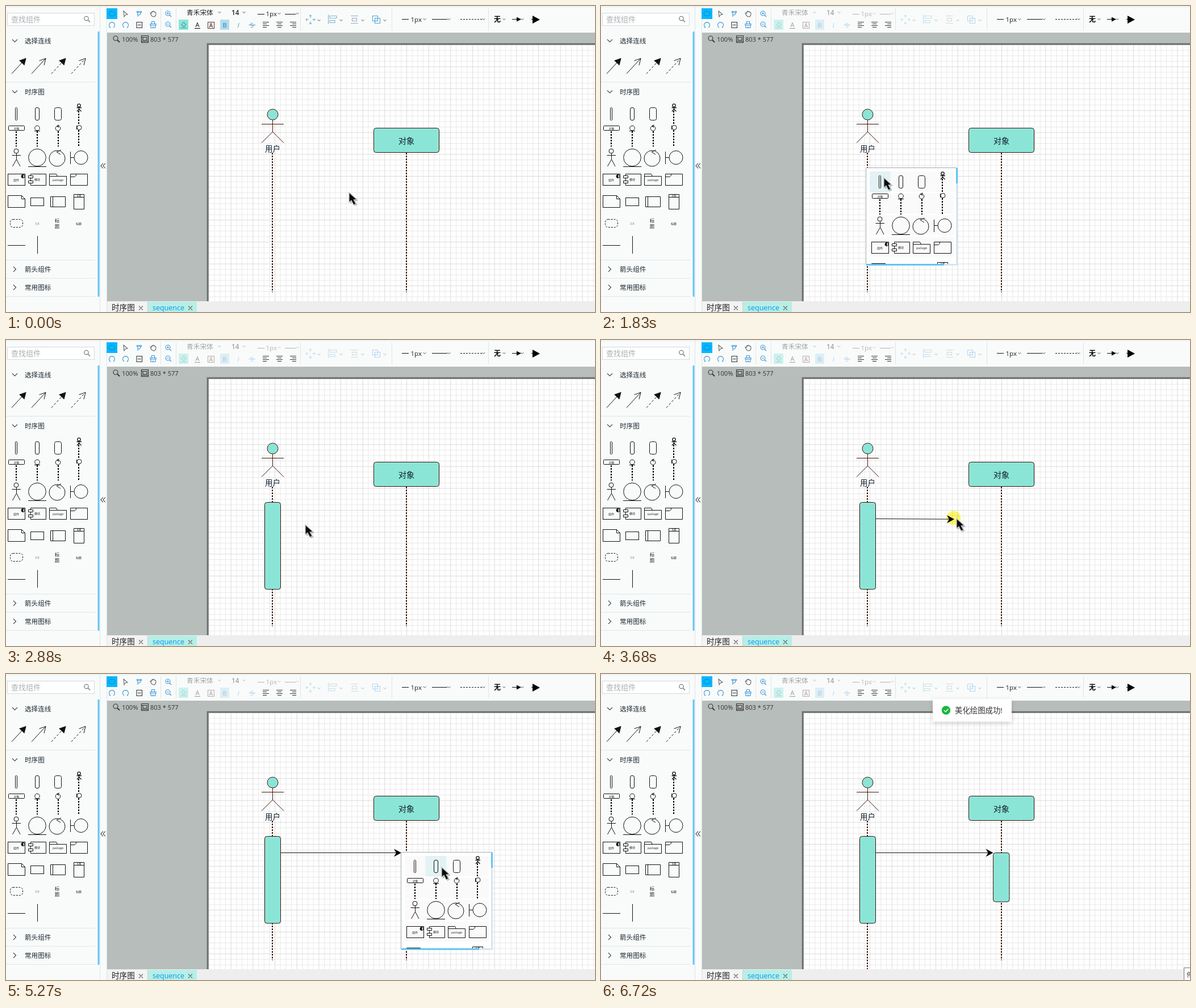
An HTML page that plays this animation: 1037x540 px, repeating every 6.78 s.

```html
<!DOCTYPE html>
<html lang="zh">
<head>
<meta charset="utf-8">
<title>时序图</title>
<style>
html,body{margin:0;width:100%;height:100%;overflow:hidden;background:#f9fbfb}
svg{display:block;width:100vw;height:100vh}
text{font-family:"Open Sans","Noto Sans CJK SC","Noto Sans CJK",sans-serif}
.ln{fill:none;stroke:#111;stroke-width:1}
.ic{fill:none;stroke-width:1.1}
.blue{stroke:#3f96d2}
.gray{stroke:#666}
.node{fill:#8be5d7;stroke:#3a1408;stroke-width:1}
.life{stroke:#451508;stroke-width:2;stroke-dasharray:3 2}
.dots{stroke:#000;stroke-width:2;stroke-dasharray:3 2}
.div{stroke:#dfe5e5;fill:none}
</style>
</head>
<body>
<svg viewBox="0 0 1037 540" preserveAspectRatio="none">
<defs>
<filter id="soft" x="-20%" y="-30%" width="140%" height="170%"><feDropShadow dx="0" dy="3" stdDeviation="4" flood-opacity=".16"/></filter>
<clipPath id="popClip"><rect width="158" height="169"/></clipPath>
<path id="head" d="M0 0L-13 -7L-9 0L-13 7Z"/>
<g id="palette" class="ln">
  <rect x="16.5" y="179.5" width="3" height="22" rx="1"/>
  <rect x="51.5" y="179.5" width="7" height="22" rx="2.5"/>
  <rect x="85.5" y="179.5" width="12" height="22" rx="3"/>
  <path d="M128.500 178.500V182M124.500 179.500H133M125 186L128.500 182L132.500 186" stroke-width="1.3"/>
  <circle cx="128.500" cy="175.500" r="2.700" stroke-width="1.300"/>
  <rect x="4.500" y="211.500" width="28" height="8" rx="1"/>
  <circle cx="55" cy="215.500" r="4.300"/><path d="M50 220.500H60"/>
  <circle cx="91.500" cy="216" r="4.300"/><path d="M93.500 210L90 212L93 214" stroke-width="1.300"/>
  <circle cx="129" cy="214.500" r="4"/><path d="M124.500 211V218"/>
  <path class="dots" d="M18 221V248M55 221V248M92 221V248M128 185V210M128 219V248"/>
  <circle cx="18" cy="256" r="4"/><path d="M18.500 260V270.500M10.500 263.500H26M11.500 283L18.500 270.500L25 283"/>
  <circle cx="55" cy="267.500" r="15.300"/><path d="M39 283.500H71"/>
  <circle cx="90" cy="269" r="14"/><path d="M97 254L89 257.500L96 262"/>
  <circle cx="132" cy="267.500" r="12"/><path d="M113.500 257V279M113.500 267.500H120"/>
  <rect x="3.500" y="296.500" width="30" height="20"/>
  <path d="M30 297.500a3 3 0 0 0 0 6z" fill="#111"/><path d="M30 297.500a3 3 0 0 1 0 6"/>
  <path d="M43.500 299V296.500H70.500V316.500H43.500V312.500M43.500 303.500V308M39.500 299.500H47.500V303.500H39.500ZM39.500 308.500H47.500V312.500H39.500Z"/>
  <path d="M76.500 300.500H106.500V316.500H76.500V296.500H88.500L90.500 300.500"/>
  <path d="M113.500 296.500H143.500V316.500H113.500ZM113.500 301.500H121L123.500 299V296.500"/>
  <path d="M3.500 334.500H27.500L33.500 340.500V355.500H3.500ZM27.500 334.500V340.500H33.500"/>
  <rect x="43.500" y="338.500" width="23" height="14"/>
  <path d="M78.500 336.500H104.500V354.500H78.500ZM82.500 336.500V354.500M100.500 336.500"/>
  <path d="M119.500 332.500H137.500V358.500H119.500ZM119.500 337.500H137.500"/>
  <rect x="7.500" y="376.500" width="22" height="14" rx="5" stroke-dasharray="3 2"/>
  <path d="M3 422.500H34M55.500 406V437"/>
  <g fill="#222" stroke="none" text-anchor="middle" font-size="5">
    <text x="18.500" y="217.500">对象</text><text x="18" y="308.500">组件</text><text x="55" y="308">模块</text>
    <text x="91.500" y="309">package</text><text x="128.500" y="336.500" font-size="4">标题</text>
    <text x="55" y="385.500" font-size="4" fill="#777">文本</text>
    <text x="90" y="382" font-size="8.500">标</text><text x="90" y="392" font-size="8.500">题</text>
    <text x="128" y="385.500" font-weight="500">标题</text>
  </g>
</g>
</defs>

<rect width="1037" height="540" fill="#f9fbfb"/>
<rect width="1037" height="3" fill="#f0f6f6"/>

<!-- sidebar -->
<rect x="2.500" y="12.500" width="153" height="22" fill="#fff" stroke="#d3dada"/>
<text x="9" y="28" font-size="13" fill="#a9aeb2">查找组件</text>
<g class="ic gray"><circle cx="141.500" cy="22" r="3.700"/><path d="M144.500 25L148 28.500"/></g>
<path class="div" d="M0 134.500H157M0 448.500H157M0 480.500H157M0 512.500H157"/>
<path class="ic" stroke="#444" d="M11 59L15.500 63.500L20 59M11 149L15.500 153.500L20 149M13 460L17.500 464.500L13 469M13 492L17.500 496.500L13 501"/>
<g font-size="11.600" font-weight="500" fill="#1d2a33">
  <text x="33" y="65.500">选择连线</text><text x="33" y="155.500">时序图</text>
  <text x="33" y="469">箭头组件</text><text x="33" y="501">常用图标</text>
</g>
<g id="links" class="ln"></g>
<use href="#palette"/>
<rect x="161.500" y="45" width="3" height="468" fill="#62c5f4"/>
<path class="ic" stroke="#333" d="M171 277.500L167 282L171 286.500M175 277.500L171 282L175 286.500"/>

<!-- toolbar -->
<path class="div" d="M177.500 0V540M272.500 4V43M299.500 4V43M518.500 4V43M679.500 4V43M849.500 4V43M165.500 0V540"/>
<rect x="177" y="4" width="19" height="19" fill="#08b6fb"/>
<rect x="181" y="9.500" width="11" height="8" rx="4" class="ic" stroke="#0877b5" stroke-dasharray="2 1.500"/>
<g class="ic gray">
  <path d="M207 9L214 15L210.500 15.500L208 19Z"/>
  <path d="M255 15L254 12.500Q255.500 11.500 256.500 13.500V10.500Q257.500 9 258.500 11V9.500Q260 8.500 260.500 10.500Q262 9.500 262.500 11.500Q264 11 264 13Q264 19 260 19Q257 19 255 15Z"/>
  <path d="M230 28.500H239.500V38.500H230ZM232 33.500H237.500" stroke="#333"/>
</g>
<g class="ic blue">
  <path d="M232 11V19M232 16Q237 16 237 12M230.500 9.500h3v2h-3zM235.500 9.500h3v2h-3z"/>
  <path d="M184 38a5 5 0 1 1 5 0M182 36.500L184 38.500M208 38a5 5 0 1 1 5 0M215 36.500L213 38.500"/>
  <path d="M256.500 31V27.500H261.500V31M254 31.500H264V34H254ZM255 34V38.500H263V34M259 36V38"/>
  <circle cx="285" cy="13" r="4"/><path d="M288 16L291 19M283 13H287M285 11V15"/>
  <circle cx="285" cy="32" r="4"/><path d="M288 35L291 38M283 32H287"/>
</g>
<g id="edit">
  <text x="318" y="16" font-size="11.700" fill="#222">青禾宋体</text>
  <text x="397" y="16" font-size="11.700" font-weight="600" fill="#222">14</text>
  <rect x="304" y="24" width="17" height="18" fill="#8be5d7"/>
  <path class="ic" stroke="#3f96a8" d="M309 33L313 28.500L317 33L313 36.500ZM307.500 38.500H318"/>
  <g font-size="11" text-anchor="middle" fill="#111">
    <text x="337" y="37">A</text><text x="361" y="37.500" font-size="10">A</text>
  </g>
  <path class="ic" stroke="#111" d="M332 39.500H342"/>
  <rect x="355.500" y="28.500" width="11" height="11" class="ic" stroke="#6b3a30"/>
  <rect x="377" y="24" width="16" height="18" fill="#b4dcea"/>
  <g font-size="11.500" text-anchor="middle" fill="#4c93c8">
    <text x="385" y="38" font-weight="600">B</text><text x="409" y="38" font-style="italic">I</text><text x="433" y="38">S</text>
  </g>
  <path class="ic blue" d="M427.500 33.500H439"/>
  <g class="ic" stroke="#79b6d3">
    <path d="M536 16V21M536 27V32M528 24H533M539 24H544M534 18L536 16L538 18M534 30L536 32L538 30M530 22L528 24L530 26M542 22L544 24L542 26"/>
    <path d="M567.500 15V32M570 17.500H582V21.500H570ZM570 25.500H579V29.500H570Z"/>
    <path d="M607 17.500H620M607 30.500H620M609.500 21.500H617.500V26.500H609.500Z" stroke="#9ab"/>
    <path d="M645.500 17.500H654.500V26.500H645.500ZM649.500 21.500H658.500V30.500H649.500Z" stroke="#4fa0d6"/>
  </g>
  <g class="chev" data-at="376,11 419,11 551,25 590,25 628,25 667,25"></g>
</g>
<g id="pen">
  <path class="ln" d="M443 14.500H455M491 14.500H510"/>
  <text x="457.500" y="18" font-size="11.500" fill="#222">1px</text>
  <g class="chev" data-at="481,13 513,13"></g>
</g>
<path class="ln" style="stroke:#333" d="M452 28.500H463M452 31.500H459M452 34.500H463M452 37.500H459M476 28.500H487M478 31.500H485M476 34.500H487M478 37.500H485M500 28.500H511M504 31.500H511M500 34.500H511M504 37.500H511"/>
<path class="ln" d="M697 23.500H709M750 23.500H777M891 23.500H900M925 23.500H930"/>
<path class="ln" d="M800 23.500H838" stroke-dasharray="3 2"/>
<path d="M899 19.500L907 23.500L899 27.500ZM927 17L940 24L927 31Z"/>
<text x="712.500" y="27.500" font-size="11.500" fill="#222">1px</text>
<text x="859" y="28" font-size="12" font-weight="bold">无</text>
<g class="chev" data-at="737,23 780,23 841,23 877,23 909,23"></g>

<!-- canvas -->
<rect x="178" y="47" width="859" height="474" fill="#b7bdbb"/>
<rect x="353" y="65" width="690" height="460" fill="#a0a5a3"/>
<rect x="354" y="66" width="690" height="460" fill="#6c706e"/>
<rect x="356" y="68" width="690" height="460" fill="#8c8f8e"/>
<rect x="357" y="69" width="690" height="460" fill="#fff"/>
<path id="minor" fill="none" stroke="#e9e9e9"/>
<path id="major" fill="none" stroke="#dbdbdb"/>
<g class="ic" stroke="#333"><circle cx="193" cy="57" r="4"/><path d="M196 60L200 64" stroke-width="1.800"/>
<path d="M238.500 52.500H250.500V64.500H238.500ZM241 55.500H248V60.500H241ZM239 62.500H250M238.500 55.500H241"/></g>
<g font-size="11.200" fill="#333"><text x="204" y="62.500">100%</text><text x="254" y="62.500" font-size="11">803 * 577</text></g>

<path id="lifeA" class="life"/>
<path class="life" d="M705 259V505"/>
<circle cx="469.500" cy="191.500" r="9.500" class="node"/>
<path class="node" d="M469.500 201V222M450 208.500H489M450 241.500L469.500 222L489 241.500" style="fill:none"/>
<rect x="647.500" y="215.500" width="115" height="43" rx="4" class="node"/>
<g font-size="13.400" font-weight="500" text-anchor="middle" fill="#111d2c">
  <text x="469.500" y="257">用户</text><text x="705" y="242.500" font-size="14">对象</text>
</g>
<rect id="barA" x="455.500" y="286.500" width="28" height="153.500" rx="4" class="node"/>
<rect id="barB" x="690.500" y="315.500" width="28.500" height="86.500" rx="4" class="node"/>
<g id="anchors" fill="#fff" stroke="#4aa3df">
  <circle cx="469.500" cy="286.500" r="3.500"/><circle cx="469.500" cy="440" r="3.500"/>
  <circle cx="455.500" cy="363" r="3.500"/><circle cx="483.500" cy="363" r="3.500"/>
</g>
<g id="arrow"><path id="shaft" class="ln"/><use id="tip" href="#head"/></g>

<g id="popup">
  <rect x="-.500" y="-.500" width="161" height="172" rx="2" fill="#fff" stroke="#9fabb2"/>
  <g clip-path="url(#popClip)">
    <path d="M6 6H154V42H6ZM6 44.500H154V80.500H6ZM6 83H154V119H6ZM6 121.500H154V157.500H6Z" fill="#fafafa"/>
    <rect id="hover" y="6" width="36.500" height="36.500" fill="#e3f2f4"/>
    <use href="#palette" x="6" y="-166"/>
  </g>
  <path d="M158 0H161V172H158ZM0 169H161V172H0Z" fill="#d5e6ee"/>
  <path d="M158 0H161V27H158ZM0 169H137V172H0Z" fill="#62c5f4"/>
</g>

<!-- tabs -->
<rect x="178" y="521" width="859" height="19" fill="#eee"/>
<rect x="178" y="522" width="71" height="18" fill="#f3f3f3"/>
<rect x="250" y="522" width="86" height="18" fill="#b6efe6"/>
<path stroke="#d0d0d0" d="M249.500 522V540"/>
<text x="186" y="537" font-size="13.600" fill="#222">时序图</text>
<text x="258" y="537" font-size="12.500" fill="#0a95f5">sequence</text>
<path class="ic gray" d="M234 529.500L241 536.500M241 529.500L234 536.500M321 529.500L328 536.500M328 529.500L321 536.500"/>

<g id="toast">
  <rect x="584" y="44" width="139" height="40" rx="2" fill="#fff" filter="url(#soft)"/>
  <circle cx="607.500" cy="64" r="7.700" fill="#18b83c"/>
  <path d="M604 64L606.700 66.700L611.300 61.700" fill="none" stroke="#fff" stroke-width="1.500"/>
  <text x="623" y="68.500" font-size="13.400" fill="#333">美化绘图成功!</text>
</g>
<g id="tooltip">
  <rect x="1026.500" y="518.500" width="60" height="30" fill="#fff" stroke="#777"/>
  <text x="1031" y="535" font-size="11.500" fill="#333">停止</text>
</g>
<circle id="click" r="12.500" fill="#fbf43c" opacity=".75" style="mix-blend-mode:multiply"/>
<g id="cursor">
  <path d="M2 2V20L6.500 17L10 24L14.500 22L11 15.500L16 14.500Z" fill="#000" opacity=".25"/>
  <path d="M0 0V17.500L4 14.300L8 22L12 20L8.300 13L13.500 12.300Z" fill="#0b0b0b" stroke="#c2c5c5" stroke-width="1.300"/>
</g>
</svg>
<script>
const LOOP = 6780;
const $ = id => document.getElementById(id);
const set = (id, attrs) => { for (const k in attrs) $(id).setAttribute(k, attrs[k]); };
const show = (id, on) => set(id, { visibility: on ? 'visible' : 'hidden' });
const move = (id, x, y) => set(id, { transform: `translate(${x} ${y})` });

for (const g of document.querySelectorAll('.chev')) {
  const d = g.dataset.at.split(' ').map(p => {
    const [x, y] = p.split(',').map(Number);
    return `M${x - 2.5} ${y - 1}l2.5 2.5l2.5 -2.5`;
  }).join('');
  g.innerHTML = `<path class="ic" stroke="#999" d="${d}"/>`;
}

$('links').innerHTML = [10, 45, 80, 115].map((x, i) => {
  const solid = i % 2 ? 'none' : '#111';
  const dash = i > 1 ? ' stroke-dasharray="4 3"' : '';
  return `<path d="M${x} 119.500L${x + 25} 92.500"${dash}/>` +
    `<path d="M${x + 13.5} 96.500L${x + 25} 92.500L${x + 22} 104.500" fill="${solid}"/>`;
}).join('');

// Every fourth grid line is a major one.
function gridPath(major) {
  const pitch = 9.667;
  let d = '';
  for (let i = 1; i < 71; i++) {
    if ((i % 4 === 0) !== major) continue;
    const x = 357.5 + i * pitch, y = 68.5 + i * pitch;
    if (x < 1037) d += `M${x} 69V521`;
    if (y < 521) d += `M357 ${y}H1037`;
  }
  return d;
}
set('minor', { d: gridPath(false) });
set('major', { d: gridPath(true) });

const drift = { 0: -10, 5: 10, 7: 10, 14: 10, 22: 20, 33: 20, 34: 10, 44: 20 };
const ticks = [0];
for (let i = 0; i < 51; i++) ticks.push(ticks[i] + 130 + (drift[i] || 0));

// time, x, y of the pointer
const track = [
  [0, 604, 329], [640, 470, 285], [1440, 470, 285], [1570, 474, 287], [1700, 482, 292],
  [1830, 498, 303], [2100, 498, 303], [2490, 663, 346], [2620, 663, 346], [2880, 527, 326],
  [3290, 487, 315], [3420, 490, 315], [3680, 626, 315], [4330, 699, 316], [4620, 699, 316],
  [5140, 757, 337], [5270, 767, 341], [5530, 767, 341], [5790, 800, 390], [6460, 1034, 545]
];

function pointer(t) {
  const i = track.findIndex(k => k[0] > t);
  if (i < 0) return track[track.length - 1].slice(1);
  const [a, b] = [track[i - 1], track[i]];
  const u = (t - a[0]) / (b[0] - a[0]);
  return [1, 2].map(k => Math.round(a[k] + (b[k] - a[k]) * u));
}

const ramp = (t, from, to) => Math.max(0, Math.min(1, (t - from) / (to - from)));

function render(now) {
  const t = ticks.findLast(k => k <= now);
  const within = (from, to) => t >= from && t < to;
  const [x, y] = pointer(t);
  move('cursor', x, y);

  show('click', within(780, 1050) || t === 1970 || within(3420, 4480) || t === 5400);
  set('click', { cx: x - 5, cy: y - 1 });

  set('pen', { opacity: 1 - .7 * ramp(t, 920, 1180) });
  set('edit', { opacity: 1 - .6 * ramp(t, 1050, 1310) });

  const first = within(1050, 2100), second = within(4620, 5530);
  const left = first ? 467 : 696, top = first ? 286 : 315;
  const cell = Math.floor((x - left - 6) / 36.7);
  show('popup', first || second);
  move('popup', left, top);
  set('hover', { x: 6 + cell * 36.7, visibility: (first || second) && cell >= 0 && y >= top + 6 ? 'visible' : 'hidden' });

  show('barA', t >= 2100);
  show('barB', t >= 5530);
  show('anchors', within(3160, 3550));
  set('lifeA', { d: `M469 259V${t >= 6070 ? 525 : 505}` });

  const dragging = t < 4480;
  const tipX = dragging ? x - 4 : t < 5530 ? 696 : 690.5;
  const tipY = dragging ? 316.2 : 315.5;
  show('arrow', t >= 3550);
  set('shaft', { d: `M484 315.500L${tipX - 8} ${tipY}` });
  move('tip', tipX, tipY);

  const drop = ramp(t, 5940, 6330);
  show('toast', drop > 0);
  set('toast', { opacity: drop });
  move('toast', 0, -15 * (1 - drop) ** 2);
  show('tooltip', t >= 6720);
}

const start = performance.now();
function loop() {
  render((performance.now() - start) % LOOP);
  requestAnimationFrame(loop);
}
loop();
</script>
</body>
</html>
```
